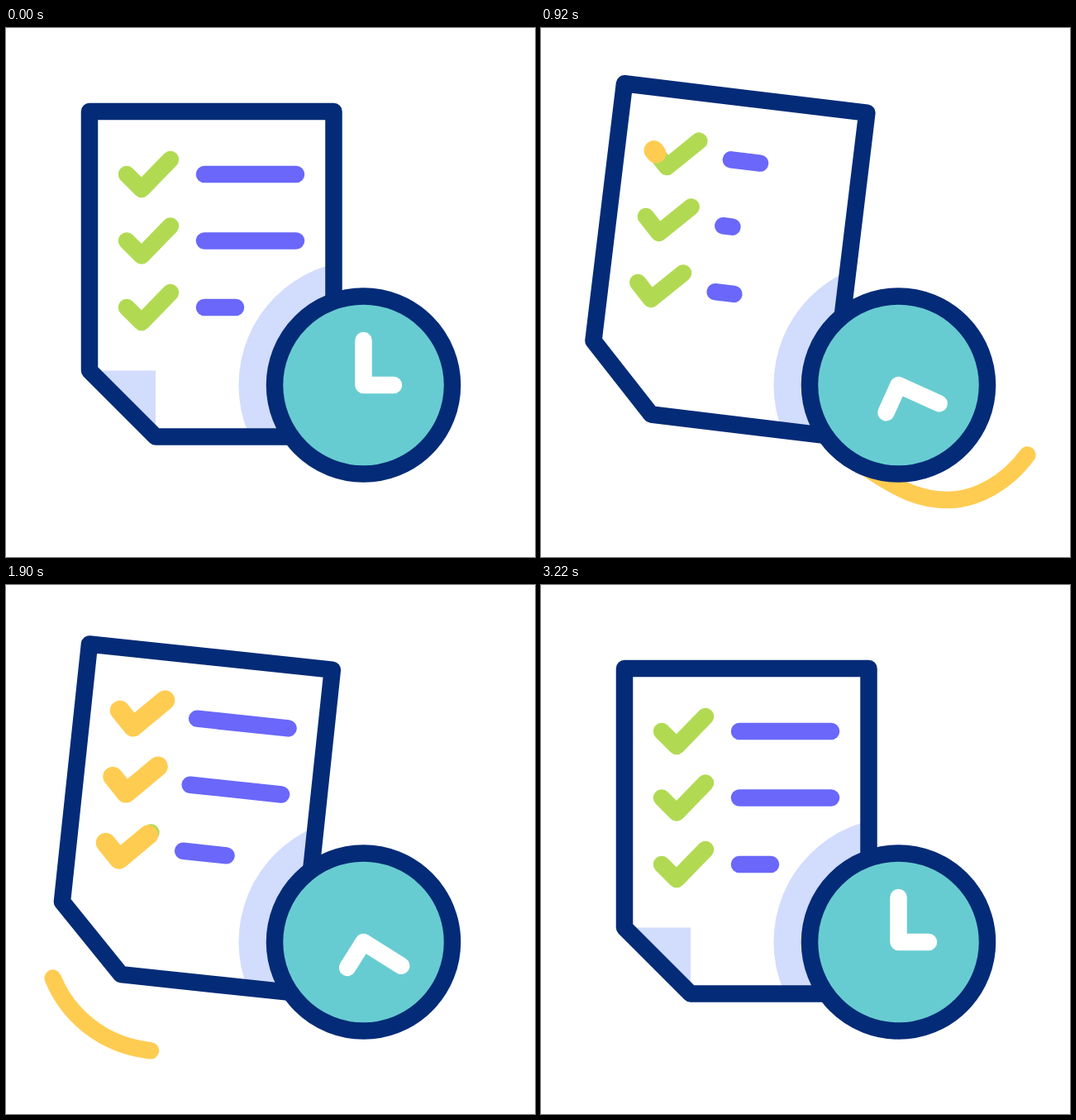
An HTML page that plays this animation: 640 by 640 pixels, repeating every 3.6 s.

```html
<!DOCTYPE html>
<html lang="en">
<head>
<meta charset="utf-8">
<title>Checklist and clock</title>
<style>
html, body { margin: 0; width: 100%; height: 100%; overflow: hidden; background: #fff; }
svg { display: block; width: 100vw; height: 100vh; }
.line { fill: none; stroke-width: 20.5; stroke-linecap: round; stroke-linejoin: round; }
.navy { stroke: #042b77; }
.green { stroke: #b1da52; }
.purple { stroke: #6a67fa; }
.yellow { stroke: #ffcc52; }
.white { stroke: #fff; }
.wide { stroke-width: 24; }
</style>
</head>
<body>
<svg viewBox="0 0 640 640">
  <defs>
    <path id="sheet" d="M0 0H295.5V393.5H80L0 313.5Z"/>
    <clipPath id="inside"><use href="#sheet" class="page"/></clipPath>
  </defs>
  <path id="swingRight" class="line yellow" pathLength="1"
    d="M618 414C624 444 617 472 600 498C575 545 530 571 492 571C462 571 437 562 392 531"/>
  <path id="swingLeft" class="line yellow" pathLength="1"
    d="M50 455C64 512 110 555 172 563C205 567 240 566 275 557"/>
  <use href="#sheet" class="page" fill="#fff"/>
  <circle cx="432.5" cy="432" r="151" fill="#d2dcfd" clip-path="url(#inside)"/>
  <g class="page">
    <path id="fold" d="M0 313.5H80V393.5Z" fill="#d2dcfd"/>
    <use href="#sheet" class="line navy"/>
    <g id="rows"></g>
  </g>
  <circle cx="432.5" cy="432" r="107.5" fill="#67ccd1" class="navy" stroke-width="20.5"/>
  <path id="hands" class="line white" d="M0-54V0H36.5"/>
</svg>
<script>
const LOOP = 3600;
const $ = id => document.getElementById(id);
const pages = document.querySelectorAll('.page');

// Eased keyframes as [time, value] pairs
const lift = [[240, 101], [780, 56], [1260, 110], [1740, 58], [2240, 113], [2900, 101]];
const tilt = [[390, 0], [890, 7], [1380, -3], [1840, 6.4], [2380, -3.3], [2900, 0]];
const spin = [[240, 0], [2940, 720]];
const foldFade = [[240, 1], [440, 0], [2800, 0], [3180, 1]];
const rows = [
  { bar: [[360, 111], [810, 0], [1120, 121], [1640, 111]], draw: 910, erase: 1900 },
  { bar: [[560, 111], [1010, 0], [1320, 119], [1840, 111]], draw: 1240, erase: 1990 },
  { bar: [[740, 38], [1160, 0], [1560, 62], [2360, 38]], draw: 1570, erase: 2240 }
];

const progress = (t, start, length) => Math.min(1, Math.max(0, (t - start) / length));
const smooth = u => u * u * (3 - 2 * u);
const ramp = (t, start, length) => smooth(progress(t, start, length));

function sample(keys, t) {
  let value = keys[0][1];
  for (let i = 1; i < keys.length; i++) {
    const [start, from] = keys[i - 1], [end, to] = keys[i];
    if (t >= start) value = from + (to - from) * ramp(t, start, end - start);
  }
  return value;
}

function trim(path, from, to) {
  path.style.display = to - from > 0.001 ? '' : 'none';
  path.style.strokeDasharray = `${to - from} 2`;
  path.style.strokeDashoffset = -from;
}

const tick = 'd="M45 76l18 18l35-36"';
$('rows').innerHTML = rows.map((row, i) => `<g transform="translate(0 ${i * 80.5})">
  <path class="line green" ${tick}/>
  <path class="line yellow wide mark" ${tick} pathLength="1"/>
  <path class="line purple bar"/></g>`).join('');
const marks = document.querySelectorAll('.mark');
const bars = document.querySelectorAll('.bar');

function render(t) {
  const pose = `translate(101 ${sample(lift, t)}) rotate(${sample(tilt, t)})`;
  pages.forEach(page => page.setAttribute('transform', pose));
  $('hands').setAttribute('transform', `translate(432.5 432) rotate(${sample(spin, t)})`);
  $('fold').setAttribute('opacity', sample(foldFade, t));
  rows.forEach((row, i) => {
    bars[i].setAttribute('d', `M139 76h${sample(row.bar, t)}`);
    const head = 1 - (1 - progress(t, row.draw, 540)) ** 3;
    const tail = progress(t, row.erase, 320) ** 2;
    trim(marks[i], tail, head);
  });
  trim($('swingRight'), ramp(t, 560, 940), ramp(t, 460, 430));
  trim($('swingLeft'), ramp(t, 1754, 857), ramp(t, 1650, 424));
}

const begin = performance.now();
function frame() {
  render((performance.now() - begin) % LOOP);
  requestAnimationFrame(frame);
}
render(0);
requestAnimationFrame(frame);
</script>
</body>
</html>
```
